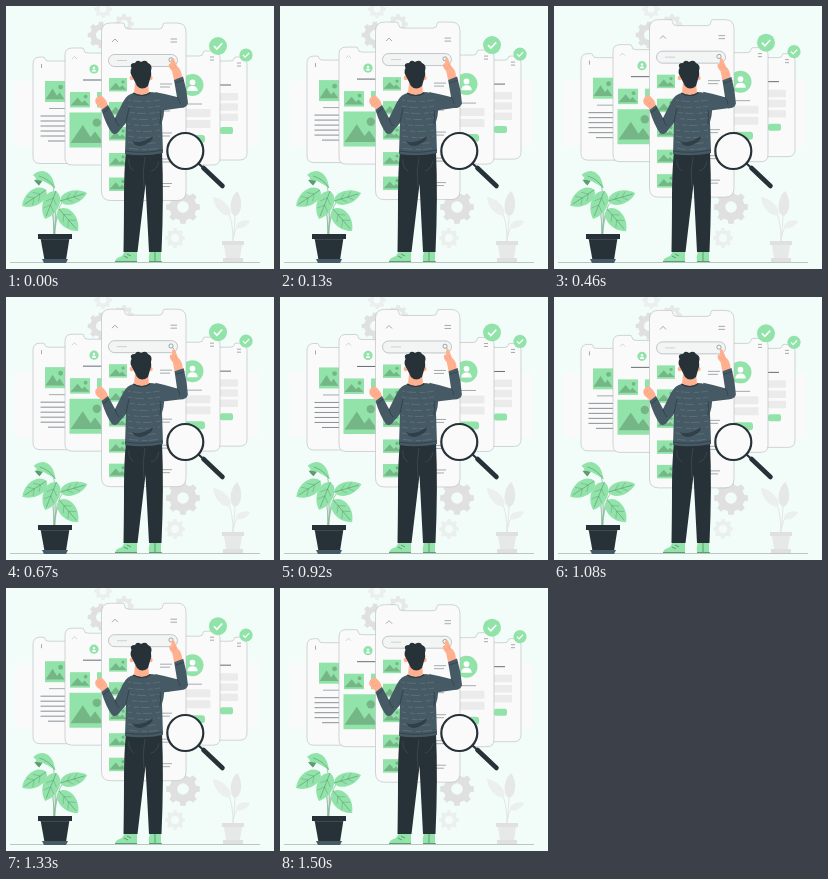
An HTML page with a canvas that plays this animation: 268x263 px, repeating every 1540 ms.

```html
<!DOCTYPE html>
<html lang="en">
<head>
<meta charset="utf-8">
<title>Searching on a phone</title>
<style>
html, body { margin: 0; width: 100%; height: 100%; overflow: hidden; background: #f2fdfa; }
canvas { display: block; width: 268px; height: 263px; }
</style>
</head>
<body>
<canvas id="stage"></canvas>
<script>
const W = 268, H = 263, LOOP = 1540, STEPS = 37, RISE = 5.6;
const INK = '#263238', GREEN = '#92e3a9', DEEP = '#75b687', PAPER = '#fafafa';
const GRAY = '#ebebeb', MID = '#e0e0e0', PALE = '#ebefee', SKIN = '#ffb08f', KNIT = '#455a64';
const EDGE = '#b4babc', MARK = '#6b767b';

const canvas = document.getElementById('stage');
const scale = window.devicePixelRatio || 1;
canvas.width = W * scale;
canvas.height = H * scale;
const c = canvas.getContext('2d');

function fill(path, color) {
  c.fillStyle = color;
  c.fill(typeof path === 'string' ? new Path2D(path) : path);
}

function stroke(path, color = MARK, width = 0.6) {
  c.strokeStyle = color;
  c.lineWidth = width;
  c.stroke(typeof path === 'string' ? new Path2D(path) : path);
}

function line(x1, y1, x2, y2, color, width) {
  stroke(`M${x1} ${y1}L${x2} ${y2}`, color, width);
}

function box(x, y, w, h, color, r = 0) {
  const p = new Path2D();
  p.roundRect(x, y, w, h, r);
  fill(p, color);
}

function disc(x, y, r, color) {
  const p = new Path2D();
  p.arc(x, y, r, 0, Math.PI * 2);
  if (color) fill(p, color);
  return p;
}

function shifted(dx, dy, draw) {
  c.save();
  c.translate(dx, dy);
  draw();
  c.restore();
}

function turned(x, y, degrees, draw) {
  c.save();
  c.translate(x, y);
  c.rotate(degrees * Math.PI / 180);
  c.translate(-x, -y);
  draw();
  c.restore();
}

function gear(x, y, r, hole, color) {
  const p = new Path2D(), teeth = 8, step = Math.PI * 2 / teeth;
  for (let i = 0; i < teeth; i++) {
    const a = i * step;
    for (const [k, rr] of [[-0.3, 0.8], [-0.2, 1], [0.2, 1], [0.3, 0.8]]) {
      p.lineTo(x + Math.cos(a + k * step) * r * rr, y + Math.sin(a + k * step) * r * rr);
    }
  }
  p.closePath();
  p.moveTo(x + hole, y);
  p.arc(x, y, hole, 0, Math.PI * 2);
  c.fillStyle = color;
  c.fill(p, 'evenodd');
}

function phone(x, y, w, h, r, inset, dip) {
  const right = x + w, bottom = y + h, a = x + inset, b = right - inset;
  const p = new Path2D(
    `M${x} ${y + r}Q${x} ${y} ${x + r} ${y}H${a - 2}Q${a} ${y} ${a} ${y + 2}` +
    `Q${a} ${y + dip} ${a + 4} ${y + dip}H${b - 4}Q${b} ${y + dip} ${b} ${y + 2}` +
    `Q${b} ${y} ${b + 2} ${y}H${right - r}Q${right} ${y} ${right} ${y + r}` +
    `V${bottom - r}Q${right} ${bottom} ${right - r} ${bottom}H${x + r}` +
    `Q${x} ${bottom} ${x} ${bottom - r}Z`);
  fill(p, PAPER);
  stroke(p, EDGE, 0.6);
}

function picture(x, y, w, h) {
  box(x, y, w, h, GREEN);
  const at = (u, v) => `${x + u * w} ${y + v * h}`;
  fill(`M${at(0.03, 0.87)}L${at(0.38, 0.36)}L${at(0.6, 0.7)}L${at(0.73, 0.54)}L${at(0.97, 0.87)}Z`, DEEP);
  disc(x + w * 0.78, y + h * 0.29, Math.min(w, h) * 0.12, DEEP);
}

function avatar(x, y, r) {
  disc(x, y, r, GREEN);
  disc(x, y - r * 0.24, r * 0.26, '#fff');
  fill(`M${x - r * 0.48} ${y + r * 0.55}Q${x - r * 0.45} ${y + r * 0.1} ${x} ${y + r * 0.1}` +
       `T${x + r * 0.48} ${y + r * 0.55}Z`, '#fff');
}

function check(x, y, r) {
  disc(x, y, r, GREEN);
  stroke(`M${x - r * 0.45} ${y}l${r * 0.32} ${r * 0.34}l${r * 0.6} ${-r * 0.64}`, '#fff', r * 0.18);
}

function menu(x, y, w) {
  line(x, y, x + w, y);
  line(x, y + 3, x + w, y + 3);
}

function leaf(x1, y1, x2, y2, fat, color, vein) {
  const dx = x2 - x1, dy = y2 - y1, len = Math.hypot(dx, dy);
  const at = (t, s) => `${x1 + dx * t - dy / len * s} ${y1 + dy * t + dx / len * s}`;
  fill(`M${x1} ${y1}C${at(0.1, fat)} ${at(0.7, fat)} ${x2} ${y2}` +
       `C${at(0.7, -fat)} ${at(0.1, -fat)} ${x1} ${y1}Z`, color);
  if (!vein) return;
  stroke(`M${x1} ${y1}L${at(0.9, 0)}`, vein, 0.5);
  for (const t of [0.25, 0.5]) {
    stroke(`M${at(t + 0.18, fat * 0.5)}L${at(t, 0)}L${at(t + 0.18, -fat * 0.5)}`, vein, 0.35);
  }
}

function backdrop() {
  box(0, 0, W, H, '#f2fdfa');
  box(9, 75, 243, 65.5, PAPER, 3);
  gear(97, 3, 9, 3.5, PALE);
  gear(95, 29, 13.5, 5, MID);
  gear(118, 18, 10, 4, '#e6e9e8');
  gear(177, 201, 17, 5.8, MID);
  gear(169, 232, 10, 4, PALE);
  for (const path of ['M227 236Q229 216 229 208', 'M227 236Q227 215 222 206', 'M228 230Q229 222 234 219']) {
    stroke(path, MID, 0.8);
  }
  leaf(229, 210, 231, 185, 7, '#e6e8e8');
  leaf(224, 209, 207, 191, 6.5, PALE);
  leaf(230, 221, 244, 215, 4.5, PALE);
  box(216, 235, 22, 4, MID);
  fill('M218 239H236L234 252H220Z', '#e7e9e8');
  box(217, 252, 20, 4, MID);
  line(4, 256.5, 254, 256.5, '#a3aeae', 0.7);
}

function leftPhones() {
  phone(27, 51, 58, 106.5, 7, 12, 4);
  line(35.5, 58, 35.5, 62);
  picture(39, 75, 20, 21);
  line(43, 102.5, 60, 102.5);
  for (let i = 0; i < 6; i++) line(i === 5 ? 42 : 34.5, 110 + i * 5, 60, 110 + i * 5, MARK, 0.8);

  phone(59, 42, 62, 117, 7, 19, 5);
  stroke('M66 53l2.5 -2.5l2.5 2.5', EDGE);
  avatar(88, 63, 4.6);
  line(77, 74, 96, 74, INK, 0.7);
  picture(64, 86, 20, 15.5);
  picture(91, 86, 20, 15.5);
  picture(63.5, 106.5, 35, 35);
}

function rightPhones() {
  phone(183, 51, 58, 103, 7, 13, 4);
  menu(231, 57, 4);
  line(214, 79, 225, 79, INK, 0.7);
  for (let i = 0; i < 3; i++) box(214, 87 + i * 10.2, 18, 7.5, GRAY, 1);
  box(214, 121, 13, 7, GREEN, 2);

  phone(152, 45, 62, 114, 7, 17, 5);
  menu(204, 51, 4);
  avatar(186.5, 79, 11);
  line(180, 98, 196, 98);
  box(178, 103, 26.5, 8, GRAY, 1);
  box(178, 114, 26.5, 8, GRAY, 1);
  box(178, 129, 21, 8, GREEN, 3);
  check(212, 40, 9);
  check(240, 49, 6.6);
}

function frontPhone() {
  phone(95.5, 17, 84.5, 177.5, 9, 23, 6);
  stroke('M106 36l3 -3l3 3');
  menu(164.5, 33, 6.5);
  const bar = new Path2D();
  bar.roundRect(102.5, 48.5, 69, 12, 6);
  fill(bar, '#f3f4f4');
  stroke(bar, '#9da5a8', 0.6);
  line(111, 54.5, 121, 54.5, EDGE);
  stroke(disc(165, 53.8, 2.1));
  line(166.5, 55.5, 168, 57);
  for (const y of [72, 96, 121, 147, 171.5]) {
    picture(103, y, 18, 13.5);
    line(154, y + 6, 166, y + 6);
    line(154, y + 9, 164, y + 9);
  }
}

function magnifier() {
  c.lineCap = 'round';
  stroke(disc(179.3, 145, 18, PAPER), INK, 2.2);
  line(192.5, 157.5, 198, 162.5, INK, 2.2);
  line(197.5, 162, 216.5, 180, INK, 4.6);
  c.lineCap = 'butt';
}

function plant(sway) {
  turned(48, 229, sway, () => {
    for (const path of ['M48 229Q52 198 47 180', 'M48 229Q48 200 39 185', 'M48 229Q47 205 50 187',
                        'M48 229Q50 203 57 195', 'M49 229Q49 213 54 205']) {
      stroke(path, '#86b496', 0.7);
    }
    const vein = '#4f8562';
    fill('M49 182Q47 167 37 165Q31 165 27 169L30 172Q28 175 33 179Q35 175 37 175Q43 178 49 182Z', GREEN);
    fill('M28 174Q33 174 36 175Q35 177 33 179.5Q30 177 28 174Z', '#5f9a72');
    stroke('M49 182Q43 173 33 170', vein, 0.5);
    leaf(40, 184, 16, 200, 10.5, GREEN, vein);
    leaf(50, 185, 39, 213, 11, GREEN, vein);
    leaf(54, 195, 81, 187, 9, GREEN, vein);
    leaf(53, 203, 72, 225, 11, GREEN, vein);
  });
  fill('M34.5 232H63.5L60 254H38.5Z', INK);
  box(32, 228, 34, 5, INK);
  line(34.5, 233.5, 63, 233.5, '#55636a', 0.5);
  fill('M36 253H62L60 257H38Z', KNIT);
}

function knitRows() {
  c.setLineDash([5, 2, 9, 4]);
  for (let y = 94; y < 146; y += 6) {
    c.lineDashOffset = y * 3;
    stroke(`M122 ${y}Q138 ${y + 3} 154 ${y}`, '#71838b', 0.5);
  }
  c.setLineDash([]);
}

function person(reach) {
  // Shoes
  fill('M119 245H131V256H109Q109 252 116 250Z', GREEN);
  fill('M144 245H155V256H143Q142 251 144 245Z', GREEN);
  stroke('M109 255.5H131M143 255.5H156M118 250l4 2M121 248l4 2M149 246V255', '#3b6c4b', 0.6);

  // Trousers
  fill('M120 145H156Q158 190 155.5 246H143L139.5 178L131.5 246H117.5Q118 215 118 190Q118 165 120 145Z', INK);
  stroke('M139 151Q136 165 138 181M123 153Q122 161 128 165M145 165Q151 164 153 155', '#4c5960', 0.5);

  // Raised arm
  turned(156, 93, reach, () => {
    fill('M168 74L166 65Q162 61 163 58L165 57L165 53Q166 51 168 53L171 60Q176 64 176 72Z', SKIN);
    stroke('M165 60l3 3M168 58l2 4', '#e09478', 0.4);
    fill('M149 86Q160 88 171 91L168 74L177 70.5Q181 84 182 97Q181 102 174 102L153 105Z', KNIT);
    stroke('M169 77L178 74M171 91Q174 94 174 98', '#2d3d46', 0.6);
  });

  // Hand on the screen edge
  fill('M98 105L91 99Q88 96 90 92L94 89.5Q96 89 98 92Q102 96 102 101Z', SKIN);
  stroke('M91 96l4 -3M93 99l4 -3', '#e09478', 0.4);

  // Sweater
  fill('M128 87Q121 88 117 96L109 112L102 99L95.5 104Q100 119 106 127Q110 130 114 124L120 117' +
       'L119 148Q138 151 157 147L156 116Q160 103 157 91Q152 86 143 86Z', KNIT);
  stroke('M97 107L103 102M120 116Q122 106 123 102M109 112Q110 117 113 120M154 104Q155 112 154 118M119 145Q138 148 157 144',
         '#2a3942', 0.7);
  knitRows();
  fill('M126 135Q134 139 147 130Q147 136 138 139Q130 142 126 135Z', '#303f48');

  // Neck and head
  fill('M129 77H142L143 87Q136 91 128 87Z', SKIN);
  stroke('M127 87Q136 92 144 87', '#2a3942', 1.2);
  disc(125.8, 72, 2.2, SKIN);
  disc(144.5, 72, 2.2, SKIN);
  fill('M127 72Q123 66 125.5 62Q123 57 129 57Q131 53 135 56Q140 53 142 57Q147 59 145 65' +
       'Q146 69 144 73L142 80Q136 85 131 80Z', INK);
}

function render(ms) {
  const phase = Math.floor(ms % LOOP / LOOP * STEPS) / STEPS;
  const lift = 1 - Math.abs(1 - phase * 2);
  c.setTransform(scale, 0, 0, scale, 0, 0);
  backdrop();
  shifted(0, -RISE * lift, () => {
    leftPhones();
    rightPhones();
    frontPhone();
  });
  magnifier();
  plant(lift * 0.7);
  person(lift * 2);
}

const start = performance.now();
function tick() {
  render(performance.now() - start);
  requestAnimationFrame(tick);
}
tick();
</script>
</body>
</html>
```
